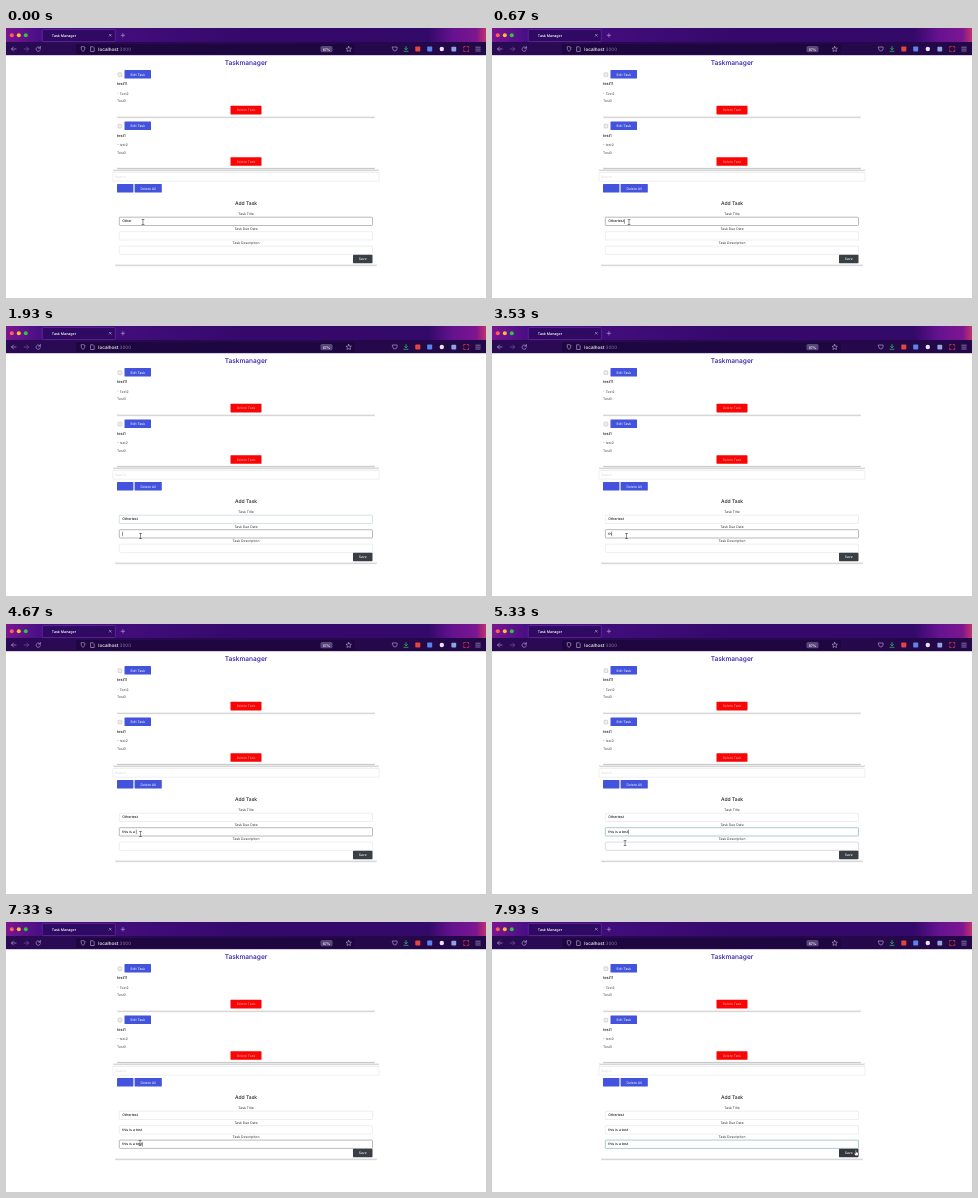
An HTML page for the animation above (8 s loop, 480 px wide and 270 px high).

```html
<!DOCTYPE html>
<html lang="en">
<head>
<meta charset="utf-8">
<title>Task Manager</title>
<style>
  html, body { margin: 0; width: 100%; height: 100%; overflow: hidden; background: #fff; }
  svg { display: block; width: 100vw; height: 100vh; }
  text { font-family: Inter, "Open Sans", sans-serif; text-rendering: geometricPrecision; white-space: pre; }
  .line { fill: none; stroke-width: .7; stroke-linecap: round; stroke-linejoin: round; }
</style>
</head>
<body>
<svg id="stage" viewBox="0 0 480 270">
  <defs>
    <linearGradient id="strip">
      <stop offset="0" stop-color="#7a1690"/>
      <stop offset=".07" stop-color="#490f85"/>
      <stop offset=".5" stop-color="#35096b"/>
      <stop offset=".88" stop-color="#33096a"/>
      <stop offset=".93" stop-color="#65128f"/>
      <stop offset=".98" stop-color="#7c1690"/>
      <stop offset="1" stop-color="#c2306b"/>
    </linearGradient>
    <linearGradient id="nav">
      <stop offset="0" stop-color="#2b0a55"/>
      <stop offset="1" stop-color="#230848"/>
    </linearGradient>
    <filter id="shadow" x="-5%" y="-10%" width="110%" height="125%">
      <feDropShadow dx="0" dy="1.2" stdDeviation=".6" flood-color="#000" flood-opacity=".26"/>
    </filter>
  </defs>
  <g id="browser"></g>
  <g id="page"></g>
  <g id="pointer">
    <path id="beam" class="line" stroke="#444" stroke-opacity=".85" d="M-1-2.5H1M0-2.5V2.5M-1 2.5H1"/>
    <path id="arrow" fill="#222" stroke="#fff" stroke-width=".3" d="M-.6-2V2.2L.5 1.3L1.2 2.7L1.9 2.3L1.3 1.1H2.5Z"/>
    <path id="hand" fill="#fff" stroke="#222" stroke-width=".5" stroke-linejoin="round" d="M-.7-2.8Q0-3.4 .4-2.6V-.9L2-.5Q2.6-.2 2.4 .6L2 2.7H-.6L-2 .7Q-1.9-.2-.7 .4Z"/>
  </g>
</svg>
<script>
const NS = 'http://www.w3.org/2000/svg';
const byId = id => document.getElementById(id);
const browser = byId('browser'), page = byId('page');

function add(parent, tag, attrs, content) {
  const node = document.createElementNS(NS, tag);
  for (const name in attrs) node.setAttribute(name, attrs[name]);
  if (content) node.textContent = content;
  return parent.appendChild(node);
}
const rect = (parent, x, y, width, height, fill, extra) =>
  add(parent, 'rect', { x, y, width, height, fill, ...extra });
const dot = (parent, cx, cy, r, fill) => add(parent, 'circle', { cx, cy, r, fill });
const line = (parent, d, stroke) => add(parent, 'path', { d, stroke, class: 'line' });
const text = (parent, x, y, size, fill, content, extra) =>
  add(parent, 'text', { x, y, 'font-size': size, fill, ...extra }, content);
const centered = { 'text-anchor': 'middle' };
const medium = { 'font-weight': 500 };

function button(x, y, width, height, fill, label, color = '#fff') {
  const box = rect(page, x, y, width, height, fill, { rx: .6 });
  text(page, x + width / 2, y + height / 2 + 1.3, 3.4, color, label, centered);
  return box;
}
const card = (x, y, width, height) =>
  rect(page, x, y, width, height, '#fff', { rx: 1, filter: 'url(#shadow)' });

function drawBrowser() {
  const icon = '#ac98cc', faint = '#6f5896';
  rect(browser, 0, 0, 480, 14.5, 'url(#strip)');
  rect(browser, 0, 14, 480, 13.2, 'url(#nav)');
  ['#ff5f57', '#febc2e', '#28c840'].forEach((color, i) => dot(browser, 5.8 + i * 7, 7.2, 2, color));
  rect(browser, 36.3, 1.6, 73, 12, '#2f0a62', { rx: 1, stroke: '#7431a8', 'stroke-width': .6 });
  text(browser, 45.8, 8.8, 3.6, '#fff', 'Task Manager', medium);
  line(browser, 'M103.3 6.3l1.9 1.9m0-1.9l-1.9 1.9M115.2 7.3h3.4m-1.7-1.7v3.4', icon);
  line(browser, 'M10 21H5.5m2-2l-2 2l2 2', icon);
  line(browser, 'M18.2 21h4.5m-2-2l2 2l-2 2', faint);
  line(browser, 'M34.2 20a2.2 2.2 0 1 0 .2 1.8M34.4 18.5v1.7h-1.7', icon);
  rect(browser, 70, 16, 279, 10, '#1e0640', { rx: 1.5 });
  line(browser, 'M77 18.6l2 .7q0 3-2 4.2q-2-1.2-2-4.2z', icon);
  line(browser, 'M85 18.8h2.2l1 1v3.7H85z', icon);
  const address = text(browser, 92.3, 22.8, 4.6, '#fff', 'localhost', medium);
  add(address, 'tspan', { fill: '#8a76a8', 'font-weight': 400 }, ':3000');
  rect(browser, 314.5, 18, 12, 6.3, '#59467a', { rx: 1.5 });
  text(browser, 320.5, 22.5, 3.5, '#fff', '67%', { ...centered, ...medium });
  line(browser, 'M342.7 18.4l.8 1.7l1.9.2l-1.4 1.3l.4 1.9l-1.7-.9l-1.7.9l.4-1.9l-1.4-1.3l1.9-.2z', icon);
  line(browser, 'M386.6 19h4.5v1.7q-.3 2.3-2.2 2.3q-2-.1-2.3-2.3z', icon);
  line(browser, 'M400 18.5v3.2m-1.4-1.3l1.4 1.4l1.4-1.4M398 23.3h4', '#27cf6a');
  rect(browser, 409.3, 18.5, 5, 5, '#e2473f', { rx: .8 });
  rect(browser, 421.2, 18.5, 5, 5, '#5b83ea', { rx: .8 });
  dot(browser, 435.8, 21, 2.2, '#e8e3ee');
  rect(browser, 445.4, 18.7, 4.8, 4.8, '#8fa5e0', { rx: .8 });
  line(browser, 'M457.7 20v-1.5h1.5m2 0h1.5V20m0 2v1.5h-1.5m-2 0h-1.5V22', '#f0413b');
  line(browser, 'M469.8 19.2h4.4m-4.4 1.9h4.4m-4.4 1.9h4.4', icon);
}

function drawTask(y, title, date) {
  card(111, y, 258, 47.6);
  rect(page, 112, y + 4, 3.8, 3.8, '#efefef', { stroke: '#b5b5b5', 'stroke-width': .5, rx: .6 });
  button(118.5, y + 1.3, 26.5, 8.5, '#4353dc', 'Edit Task');
  text(page, 111, y + 16.4, 3.9, '#222', title, medium);
  dot(page, 111.9, y + 24.3, .4, '#777');
  text(page, 113.7, y + 26, 3.4, '#444', date);
  text(page, 111, y + 33.3, 3.4, '#444', 'Test3');
  button(224.5, y + 37, 31, 8.6, '#fa0505', 'Delete Task', '#f3a3a3');
}

function drawField(label, y) {
  text(page, 240, y - 1.9, 3.4, '#333', label, centered);
  const box = rect(page, 113.3, y, 253.2, 8.3, '#fff', { rx: .8, 'stroke-width': .6 });
  const value = text(page, 116.2, y + 5.2, 3.5, '#222', '', medium);
  const caret = rect(page, 0, y + 1.9, .45, 4.6, '#222');
  return { y, box, value, caret };
}

drawBrowser();
text(page, 240, 36.6, 6.6, '#2a18a8', 'Taskmanager', { ...centered, ...medium });
card(107, 39, 266, 102.6);
drawTask(40.8, 'test11', 'Text2');
drawTask(92.2, 'test1', 'test2');
rect(page, 107, 144.7, 266, 8.4, '#fff', { stroke: '#e3e5e8', 'stroke-width': .6 });
text(page, 109, 150.2, 3.3, '#d8d8d8', 'Search');
button(111, 156, 16.4, 8.5, '#4353dc', '· · ·', '#2b3698');
button(128.6, 156, 27.2, 8.5, '#4353dc', 'Delete All');
card(109, 167, 262, 69.6);
text(page, 240, 176.8, 5, '#222', 'Add Task', { ...centered, ...medium });
const fields = [drawField('Task Title', 189.2), drawField('Task Due Date', 203.7), drawField('Task Description', 218.1)];
const save = button(347, 226.8, 19.5, 8.4, '#3a3f45', 'Save');

// [time, typed text so far]
const typing = [
  [[0, 'Other'], [70, 'Othert'], [130, 'Otherte'], [270, 'Othertes'], [470, 'Othertest']],
  [[0, ''], [2670, 't'], [2730, 'th'], [3800, 'thi'], [3930, 'this'], [4270, 'this i'], [4330, 'this is'],
   [4470, 'this is '], [4600, 'this is a'], [4670, 'this is a '], [4730, 'this is a t'],
   [5000, 'this is a te'], [5070, 'this is a tes'], [5130, 'this is a test']],
  [[0, ''], [6130, 't'], [6200, 'th'], [6270, 'thi'], [6330, 'this'], [6530, 'this i'], [6670, 'this is'],
   [6730, 'this is '], [6800, 'this is a'], [6930, 'this is a '], [7130, 'this is a t'],
   [7200, 'this is a te'], [7270, 'this is a tes'], [7330, 'this is a test']]
];
const focus = [[0, 0], [1870, 1], [5470, 2]];
const caretOff = [[0, 70], [1000, 1870], [2470, 2670], [3000, 3530], [4130, 4270], [5930, 6130], [7530, 8000]];
const path = [
  [0, 137, 194], [670, 137, 194], [1000, 137, 219], [1270, 137, 215], [1400, 137, 215], [1730, 134.5, 210],
  [5130, 134.5, 210], [5330, 133, 219], [5530, 134, 221], [7470, 134, 221], [7530, 222, 214],
  [7600, 222, 214], [7670, 300, 220], [7800, 356, 229], [7930, 364, 231], [8100, 364, 231]
];

const latest = (list, t) => list.filter(([start]) => start <= t).pop()[1];

function pointerAt(t) {
  const i = path.findIndex(p => p[0] > t);
  const [t0, x0, y0] = path[i - 1], [t1, x1, y1] = path[i];
  const k = (t - t0) / (t1 - t0);
  return [x0 + (x1 - x0) * k, y0 + (y1 - y0) * k];
}

const inField = (y, field) => y > field.y - .5 && y < field.y + 8.8;

function borderAt(i, t) {
  const [, y] = pointerAt(t);
  if (inField(y, fields[i])) return [138, 140, 143];
  return latest(focus, t) === i ? [118, 168, 168] : [224, 227, 231];
}

// Borders ease by averaging their recent states.
function fadedBorder(i, t) {
  const states = [0, 65, 130].map(lag => borderAt(i, Math.max(0, t - lag)));
  return `rgb(${[0, 1, 2].map(c => Math.round(states.reduce((sum, s) => sum + s[c], 0) / 3))})`;
}

function draw(t) {
  const active = latest(focus, t);
  const caretOn = !caretOff.some(([from, to]) => t >= from && t < to);
  fields.forEach((field, i) => {
    const value = latest(typing[i], t);
    if (field.value.textContent !== value) field.value.textContent = value;
    field.box.setAttribute('stroke', fadedBorder(i, t));
    const width = value ? field.value.getComputedTextLength() : 0;
    field.caret.setAttribute('x', 116.3 + width);
    field.caret.setAttribute('visibility', active === i && caretOn ? 'visible' : 'hidden');
  });
  const [x, y] = pointerAt(t);
  const overSave = x > 347 && x < 366.5 && y > 227;
  const kind = overSave ? 'hand' : fields.some(f => inField(y, f)) ? 'beam' : 'arrow';
  save.setAttribute('fill', overSave ? '#34383c' : '#3a3f45');
  byId('pointer').setAttribute('transform', `translate(${x} ${y})`);
  for (const id of ['beam', 'arrow', 'hand']) byId(id).style.display = id === kind ? '' : 'none';
}

const STEP = 200 / 3;
const started = performance.now();
function tick() {
  const t = (performance.now() - started) % 8000;
  draw(Math.min(7999, Math.floor(t / STEP + .06) * STEP + 4));
  requestAnimationFrame(tick);
}
tick();
</script>
</body>
</html>
```
